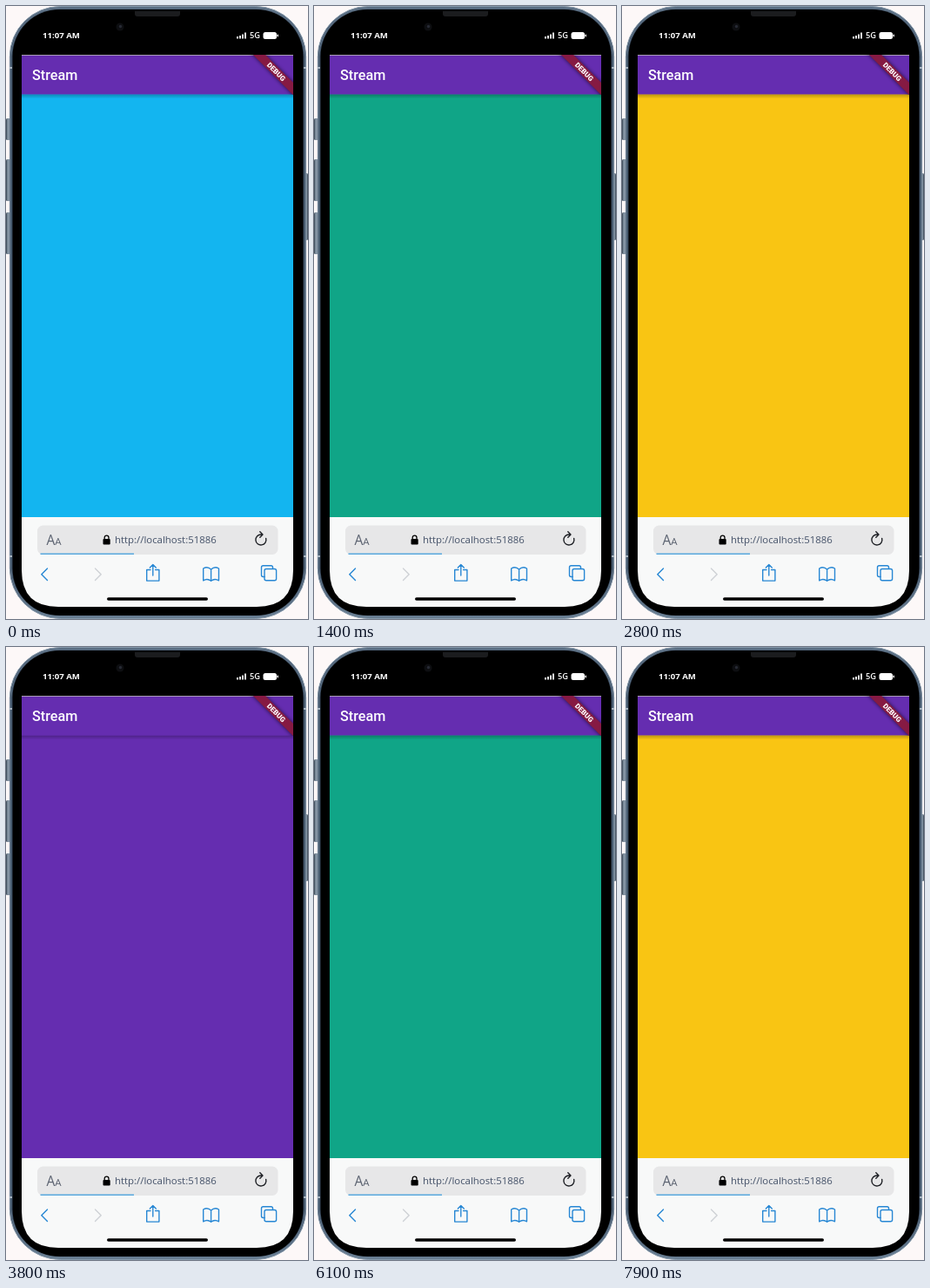
Animation, 347 px wide and 704 px high, one loop 8 s. Source, as an HTML page:

```html
<!DOCTYPE html>
<html lang="en">
<head>
<meta charset="utf-8">
<title>Stream</title>
<style>
  html, body { margin: 0; width: 100%; height: 100%; overflow: hidden; background: #fdf8f8; }
  svg { display: block; width: 100vw; height: 100vh; }
  .sans { font-family: "Open Sans", "Noto Sans", sans-serif; }
  .roboto { font-family: Roboto, Arial, sans-serif; }
  .icon { fill: none; stroke: #2787d4; stroke-width: 1.4; stroke-linecap: round; stroke-linejoin: round; }
</style>
</head>
<body>
<svg viewBox="0 0 347 704">
  <defs>
    <linearGradient id="metal" x2="0" y2="1">
      <stop offset="0" stop-color="#52657a"/>
      <stop offset=".08" stop-color="#34455a"/>
      <stop offset=".92" stop-color="#34455a"/>
      <stop offset="1" stop-color="#667b90"/>
    </linearGradient>
    <linearGradient id="key">
      <stop offset="0" stop-color="#33414f"/>
      <stop offset=".5" stop-color="#93a3b3"/>
      <stop offset="1" stop-color="#33414f"/>
    </linearGradient>
    <linearGradient id="shade" x2="0" y2="1">
      <stop offset="0" stop-opacity=".24"/>
      <stop offset="1" stop-opacity="0"/>
    </linearGradient>
    <clipPath id="screen">
      <path d="M18 56H330V648Q330 690 288 690H60Q18 690 18 648Z"/>
    </clipPath>
    <clipPath id="bar"><rect x="18" y="56" width="312" height="46"/></clipPath>
    <filter id="soft" x="-20%" y="-80%" width="140%" height="260%"><feGaussianBlur stdDeviation="2"/></filter>
  </defs>

  <!-- phone body -->
  <g fill="url(#key)">
    <rect x="0" y="129" width="5" height="25" rx="1.5"/>
    <rect x="0" y="176" width="5" height="48" rx="1.5"/>
    <rect x="0" y="237" width="5" height="48" rx="1.5"/>
    <rect x="343" y="192" width="4" height="77" rx="1.5"/>
  </g>
  <rect x="4.3" y=".5" width="340.4" height="703" rx="58" fill="url(#metal)" stroke="#8598aa"/>
  <rect x="6" y="2.2" width="337" height="699.6" rx="56" fill="none" stroke="#6f8499" stroke-width=".7"/>
  <rect x="7.5" y="4" width="334" height="696" rx="54"/>
  <path d="M4 71h3M4 632h3M342 71h3M342 632h3" stroke="#a9b6c2" stroke-width="2"/>
  <path d="M148 6H200V9Q200 12 197 12H151Q148 12 148 9Z" fill="#1b1c1e"/>
  <circle cx="131" cy="24" r="4.5" fill="#0d0e11"/>
  <circle cx="131.5" cy="23.5" r="1.7" fill="#272a34"/>

  <!-- status bar -->
  <g class="sans" fill="#fff" font-weight="700">
    <text x="42" y="37.3" font-size="9.6">11:07 AM</text>
    <text x="280" y="37.3" font-size="9.3" font-weight="600">5G</text>
    <path d="M266 37.5v-2.5M269 37.5v-3.5M272 37.5v-5M275 37.5v-7" stroke="#fff" stroke-width="1.8"/>
    <rect x="295.5" y="30" width="15.5" height="8" rx="2.5"/>
    <rect x="311.5" y="32.5" width="1.4" height="3" rx=".7"/>
  </g>

  <g clip-path="url(#screen)">
    <rect id="body" x="18" y="100" width="312" height="488"/>
    <rect x="18" y="101.5" width="312" height="5" fill="url(#shade)"/>
    <rect x="18" y="56" width="312" height="45.5" fill="#652db0"/>
    <path d="M18 56.5H330" stroke="#a99bb5"/>
    <text class="roboto" x="30" y="85.3" font-size="16.2" font-weight="500" fill="#fff">Stream</text>
    <g clip-path="url(#bar)">
      <g transform="translate(330 56) rotate(45)">
        <rect x="-40" y="22.6" width="80" height="10" opacity=".65" filter="url(#soft)"/>
        <rect x="-40" y="22.6" width="80" height="10" fill="#861a43"/>
        <text class="roboto" y="30.5" font-size="8.2" font-weight="900" text-anchor="middle" fill="#fff">DEBUG</text>
      </g>
    </g>

    <!-- browser controls -->
    <rect x="18" y="587" width="312" height="104" fill="#f8f9f9"/>
    <rect x="36" y="596.5" width="276.5" height="33.5" rx="6.5" fill="#e7e7e8"/>
    <path d="M39.5 629.2H147" stroke="#58a8de" stroke-width="1.6"/>
    <g class="sans">
      <text x="46.5" y="619.3" font-size="15.5" fill="#5b6270">A<tspan font-size="11.5">A</tspan></text>
      <text x="125" y="617" font-size="11.4" fill="#455269">http://localhost:51886</text>
    </g>
    <rect x="111.5" y="612" width="8.2" height="6.4" rx="1"/>
    <path d="M113.2 612.5v-2a2.4 2.4 0 0 1 4.8 0v2" fill="none" stroke="#000" stroke-width="1.3"/>
    <path d="M298.7 611.5a6 6 0 1 1-5.8-4.5h1.5M291.8 603.8l3.2 3.2-3.2 3.2" class="icon" style="stroke:#1d1f24"/>
    <g class="icon">
      <path d="M47.5 646l-6.7 6.7 6.7 6.7"/>
      <path d="M102.5 646l6.7 6.7-6.7 6.7" stroke="#cfd2d6"/>
      <path d="M166 647.5h-4.3v12.6h14.2v-12.6h-4.3M168.8 654v-12.3M165.3 645l3.5-3.5 3.5 3.5"/>
      <path d="M235.6 647v13.3Q231.5 656.8 226.7 659.8V646Q231.5 643 235.6 647Q239.7 643 244.5 646V659.8Q239.7 656.8 235.6 660.3"/>
      <path d="M297 655.5h-1.5q-2 0-2-2v-8.7q0-2 2-2h9q2 0 2 2v1.5"/>
      <rect x="297" y="646.5" width="13.6" height="13.3" rx="2"/>
    </g>
    <rect x="116" y="679.2" width="116" height="3.6" rx="1.8"/>
  </g>
</svg>
<script>
  const LOOP = 8000, PERIOD = 1000, LEAD = 200;
  const colors = ['#13b5f0', '#10a587', '#638a98', '#f9c513', '#652db0'];
  const body = document.getElementById('body');
  const start = performance.now();

  // The stream emits the next colour once every period.
  function draw(now) {
    const t = Math.max(0, now - start) % LOOP;
    body.setAttribute('fill', colors[Math.floor((t + LEAD) / PERIOD) % colors.length]);
    requestAnimationFrame(draw);
  }
  draw(start);
</script>
</body>
</html>
```
